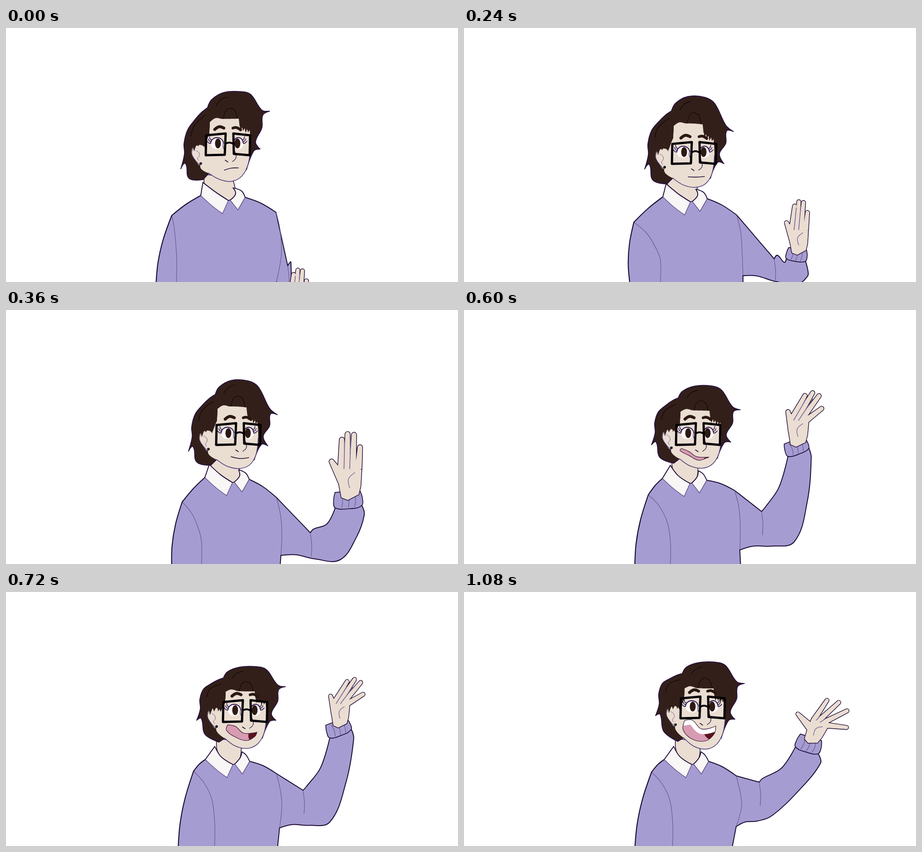
An HTML page with a canvas that plays this animation: 998x561 px, repeating every 1200 ms.

```html
<!DOCTYPE html>
<html lang="en">
<head>
<meta charset="utf-8">
<title>Waving hello</title>
<style>
html, body { margin: 0; width: 100%; height: 100%; overflow: hidden; background: #fff; }
canvas { display: block; }
</style>
</head>
<body>
<canvas id="stage" width="998" height="561"></canvas>
<script>
const ctx = document.getElementById('stage').getContext('2d');
ctx.lineJoin = ctx.lineCap = 'round';
const INK = '#1d0a33', SOFT = '#6c5590', LASH = '#2a1350', HAIR = '#331f1a', SKIN = '#eaddd1',
  KNIT = '#a59dd2', CLOTH = '#f9f6f6', FRAME = '#050308';

// head: x, y, height   droop: hair left, right   look: face offset   mouth: smile, open
// body: left shoulder, left hem x, seam reach   tip: right shoulder   pit: armpit, hem x
// crook, elbow: bend of the arm   cuff: x, y, tilt, size   hand: length, lean, spread, palm lean
const poses = [
  { head: [490, 243, 1.03], droop: [1.3, -0.2], look: [0, 13], mouth: [0, 0], body: [366, 414, 331, 10], collar: [492, 380],
    tip: [596, 407], pit: [597, 561, 597], crook: [622, 525], elbow: [600, 580], cuff: [640, 650, 0, 1], hand: [113, 2, 0.9, 0] },
  { head: [503, 254, 1.05], droop: [1, 1], look: [5, 21], mouth: [0.15, 0], body: [375, 429, 367, 58], collar: [501, 383],
    tip: [602, 413], pit: [616, 547, 616], crook: [685, 510], elbow: [737, 565], cuff: [735, 499, 0.15, 0.8], hand: [113, 2, 0.9, 0] },
  { head: [507, 255, 1.02], droop: [1, 1], look: [6, 18], mouth: [0.25, 0], body: [389, 424, 366, 42], collar: [501, 380],
    tip: [597, 414], pit: [607, 542, 605], crook: [672, 492], elbow: [737, 552], cuff: [755, 416, -0.08, 1.1], hand: [141, 0, 1, 0] },
  { head: [514, 259, 1], droop: [1, 1], look: [-3, 14], mouth: [0.25, 0], body: [404, 412, 382, 38], collar: [498, 386],
    tip: [596, 406], pit: [611, 547, 603], crook: [671, 467], elbow: [702, 545], cuff: [753, 351, -0.25, 1.1], hand: [130, 14, 1.2, 2] },
  { head: [518, 261, 0.95], droop: [0.5, 0.3], look: [-1, 12], mouth: [0.9, 0.1], body: [407, 408, 377, 48], collar: [500, 382],
    tip: [598, 399], pit: [609, 530, 611], crook: [657, 445], elbow: [729, 512], cuff: [733, 300, -0.36, 0.92], hand: [120, 19, 1.3, 2] },
  { head: [525, 258, 0.94], droop: [0.2, 0], look: [3, 4], mouth: [0.95, 0.5], body: [414, 396, 380, 46], collar: [502, 380],
    tip: [597, 401], pit: [604, 521, 599], crook: [656, 438], elbow: [715, 508], cuff: [733, 298, -0.37, 0.95], hand: [108, 21, 1.4, 2] },
  { head: [527, 254, 1], droop: [0, 0], look: [0, 0], mouth: [1, 1], body: [414, 398, 377, 46], collar: [504, 380],
    tip: [601, 406], pit: [601, 518, 591], crook: [652, 420], elbow: [680, 494], cuff: [762, 334, 0.3, 0.98], hand: [108, 41, 2.4, 27] }
];

// Head outlines around the middle of the face.
const hair = [-55,76, -86,54, -94,16, -104,19, -96,-6, -97,-29, -89,-52, -72,-63, -58,-70, -45,-74, -36,-88, -9,-98,
  28,-99, 50,-92, 75,-56, 92,-52, 77,-45, 75,-18, 61,11, 71,27, 57,30, 41,69, -2,36, -42,68];
const face = [-40,-41, -28,-46, -15,-42, 5,-41, 24,-41, 26,-24, 48,-16, 50,18, 45,56, 31,82, 8,93, -19,87, -42,68, -61,46, -49,1, -41,-22];

const mix = (a, b, k) => a.map((v, i) => v + (b[i] - v) * k);
const add = (p, x, y) => p.map((v, i) => v + (i % 2 ? y : x));
const pt = (p, i) => p.slice(2 * i, 2 * i + 2);
const turn = ([x, y], a) => [x * Math.cos(a) - y * Math.sin(a), x * Math.sin(a) + y * Math.cos(a)];

function poseAt(step) {
  const u = step < 2 ? step / 2 : step < 6 ? step - 1 : 5 + (step - 6) / 3;
  const i = Math.min(Math.floor(u), poses.length - 2), out = {};
  for (const key in poses[i]) out[key] = mix(poses[i][key], poses[i + 1][key], u - i);
  return out;
}

// Smooth line through x,y pairs; the points listed in sharp stay corners.
function curve(p, closed, sharp = []) {
  const n = p.length / 2, at = i => pt(p, i % n);
  const dir = i => {
    i %= n;
    if (sharp.includes(i) || (!closed && (i === 0 || i === n - 1))) return [0, 0];
    const a = at(i + n - 1), b = at(i + 1), d = Math.hypot(b[0] - a[0], b[1] - a[1]) || 1;
    return [(b[0] - a[0]) / d, (b[1] - a[1]) / d];
  };
  ctx.beginPath();
  ctx.moveTo(...at(0));
  for (let i = 0; i < (closed ? n : n - 1); i++) {
    const a = at(i), b = at(i + 1), s = dir(i), e = dir(i + 1);
    const r = Math.hypot(b[0] - a[0], b[1] - a[1]) * 0.35;
    ctx.bezierCurveTo(a[0] + s[0] * r, a[1] + s[1] * r, b[0] - e[0] * r, b[1] - e[1] * r, b[0], b[1]);
  }
  if (closed) ctx.closePath();
}
function paint(fill, line, width) {
  if (fill) { ctx.fillStyle = fill; ctx.fill(); }
  if (line) { ctx.strokeStyle = line; ctx.lineWidth = width; ctx.stroke(); }
}
function shape(p, fill, line, width, sharp) { curve(p, true, sharp); paint(fill, line, width); }
function stroke(p, line, width, sharp) { curve(p, false, sharp); paint(null, line, width); }
function oval(x, y, rx, ry, fill) {
  ctx.beginPath();
  ctx.ellipse(x, y, rx, ry, 0, 0, Math.PI * 2);
  paint(fill);
}

function drawBody(p) {
  const [sx, sy, hem, reach] = p.body, [cx, cy] = p.collar, [tx, ty] = p.tip, [px, py, hemR] = p.pit;
  const [x, y, tilt, size] = p.cuff, shoulder = [sx, sy], foot = [hem, 570], neck = [cx - 62, cy - 10];
  const side = [...foot, ...add(mix(foot, shoulder, 0.33), -7, 0), ...add(mix(foot, shoulder, 0.66), -7, 0),
    ...shoulder, ...add(mix(shoulder, neck, 0.5), 0, -3), ...neck];
  const top = [cx + 36, cy - 6, ...add(mix([cx + 36, cy - 6], p.tip, 0.5), 0, -4), tx, ty];
  const seam = [tx, ty, tx + 9, ty + 38, tx + 12, ty + (py - ty) * 0.6, px, py];

  const cuffL = add(turn([-27 * size, 17 * size], tilt), x, y), cuffR = add(turn([27 * size, 17 * size], tilt), x, y);
  const upper = [tx, ty, ...mix(p.tip, p.crook, 0.55), ...p.crook, ...add(p.crook, 7, -8),
    ...add(mix(p.crook, cuffL, 0.5), 9, 8), ...cuffL];
  const pit = [px, py];
  const lower = [...cuffR, ...add(cuffR, 5, 20), ...add(mix(cuffR, p.elbow, 0.55), 14, 5), ...p.elbow,
    ...add(mix(p.elbow, pit, 0.42), 0, 2), ...add(mix(p.elbow, pit, 0.75), 0, -4), ...pit];

  shape([...upper, ...lower], KNIT, null, 0, [0, 2, 5, 6, 12]);
  shape([...side, ...top, ...seam.slice(2), hemR, 570], KNIT, null, 0, [0, 3, 5, 6, 8, 11, 12]);
  stroke(upper, INK, 2, [2]);
  stroke(lower, INK, 2);
  stroke(seam, SOFT, 1.2);
  stroke([px, py, hemR, 570], INK, 2);
  stroke([sx, sy, sx + reach * 0.5, sy + 25, sx + reach * 0.88, sy + 62, sx + reach + 1, 515, sx + reach, 570], SOFT, 1.2);
  stroke(add([0, 2, 3, 27, 2, 52], ...p.crook), SOFT, 1.2);
  stroke(side, INK, 2.2, [3]);
  stroke(top, INK, 2);
}

function drawCuff([x, y, tilt, size]) {
  const at = (u, v) => add(turn([u * size, v * size], tilt), x, y);
  shape([...at(-27, 17), ...at(-29, 2), ...at(-25, -14), ...at(25, -14), ...at(29, 2), ...at(26, 17), ...at(0, 21)],
    KNIT, INK, 1.7, [2, 3]);
  for (const u of [-13, 0, 13]) stroke([...at(u, -10), ...at(u + 2, 5), ...at(u - 1, 18)], SOFT, 1.2);
}

function drawHand(p) {
  const [size, lean, spread, palm] = p.hand, rad = Math.PI / 180, x = p.cuff[0] + 4, y = p.cuff[1] - 6;
  const at = (u, v) => add(turn([u * size, v * size], palm * rad), x, y);
  const hand = new Path2D(), bases = [], tips = [];
  // Thumb to little finger: angle and length.
  [[-28, 0.64], [-8, 0.92], [-2, 1], [4, 0.99], [12, 0.81]].forEach(([angle, length], i) => {
    const base = i ? at(-0.225 + 0.09 * i, -0.42) : at(-0.09, -0.22);
    const wide = size * (i ? 0.052 : 0.09), round = size * 0.036;
    const [tx, ty] = add(turn([0, -size * length + round], (lean + angle * spread) * rad), x, y);
    const a = Math.atan2(ty - base[1], tx - base[0]), nx = -Math.sin(a) * wide, ny = Math.cos(a) * wide;
    const finger = new Path2D();
    finger.moveTo(base[0] - nx, base[1] - ny);
    finger.arc(tx, ty, round, a - Math.PI / 2, a + Math.PI / 2);
    finger.lineTo(base[0] + nx, base[1] + ny);
    finger.closePath();
    hand.addPath(finger);
    bases.push(base);
    tips.push([tx, ty]);
  });
  const flat = new Path2D();
  [[-0.13, 0.03], [-0.17, -0.18], [-0.19, -0.42], [-0.1, -0.47], [0.12, -0.46], [0.185, -0.4], [0.17, -0.15], [0.14, -0.02], [-0.03, 0.07]]
    .forEach(q => flat.lineTo(...at(...q)));
  flat.closePath();
  hand.addPath(flat);
  ctx.strokeStyle = INK;
  ctx.lineWidth = 2.8;
  ctx.stroke(hand);
  ctx.fillStyle = SKIN;
  ctx.fill(hand);
  const split = Math.min(0.85, 1.4 / spread ** 2);
  for (const i of [1, 2]) {
    const low = mix(bases[i], bases[i + 1], 0.5);
    stroke([...low, ...mix(low, mix(tips[i], tips[i + 1], 0.5), split)], SOFT, 1.5);
  }
  stroke([...at(0.08, -0.36), ...at(-0.02, -0.26), ...at(0, -0.12)], SOFT, 1.2);
}

function drawCollar(p) {
  const [cx, cy] = p.collar, drift = p.head[0] - cx, tl = -56 + 0.65 * drift, tr = 10 + 0.4 * drift;
  const left = add([tl, -39, -62, -10, -38, 12, -14, 30, -1, 1, -27, -16], cx, cy);
  const right = add([tr, -27, 15, -14, 3, 0, 20, 22, 36, -6, 28, -20], cx, cy);
  shape([...add([tl + 4, -57, tl + 5, -31, -27, -16, -1, 1, 3, 0, 15, -14, tr - 2, -49], cx, cy)], SKIN, INK, 1.5, [0, 3, 4, 6]);
  shape(left, CLOTH, SOFT, 1.6, [0, 1, 3, 4]);
  shape(right, CLOTH, SOFT, 1.6, [0, 2, 3, 4]);
  stroke([...pt(left, 1), ...pt(left, 0), ...pt(left, 5), ...pt(left, 4)], INK, 1.7, [1]);
  stroke([...right.slice(8), ...right.slice(0, 6)], INK, 1.7, [2]);
}

// Fringe ends hanging along the line a-b.
function spikes(a, b, n, len) {
  ctx.beginPath();
  ctx.moveTo(a[0], a[1] - 6);
  for (let i = 0; i < n; i++) {
    const [x, y] = mix(a, b, (i + 0.35) / n);
    ctx.lineTo(x, y + len * (i % 2 ? 0.7 : 1));
    ctx.lineTo(...mix(a, b, (i + 1) / n));
  }
  ctx.lineTo(b[0], b[1] - 6);
  ctx.closePath();
  paint(HAIR);
}

function drawEye(x, y, side) {
  const w = side < 0 ? 14 : 11, cx = x + side * 2, inner = cx - side * w;
  oval(cx, y, w, 13, '#fffafa');
  oval(x, y, 6.5, 11, '#2d1a12');
  ctx.beginPath();
  ctx.ellipse(cx, y, w, 13, 0, Math.PI * 1.02, Math.PI * 1.98);
  paint(null, LASH, 2);
  stroke([inner, y - 3, inner + side, y + 5, inner - side, y + 12], '#4b3578', 1.3);
  for (let i = 0; i < 3; i++) {
    const ex = cx + side * (w - i * 1.6), ey = y - i * 4;
    stroke([ex, ey, ex + side * 4, ey - 1, ex + side * (8 - i), ey - 5 - i], LASH, 1.6);
  }
}

function drawMouth(x, y, [smile, open]) {
  const l = [x - 8 - 32 * smile, y + 58 - 28 * smile], r = [x + 23 + 6 * open, y + 53 - 11 * open];
  if (open === 0) {
    stroke([...l, ...add(mix(l, r, 0.5), 0, 20 * smile - 2), ...r], INK, 1.6);
    return;
  }
  const lip = [...l, ...add(l, 17, 8 - 9 * open), ...add(mix(l, r, 0.55), 0, 7 + 5 * open), ...r];
  const mouth = [...lip, ...add(r, -4, 18 * open), ...add(r, -23, 4 + 29 * open), ...add(l, 17, 13 + 28 * open), ...add(l, -3, 3 + 18 * open)];
  ctx.save();
  curve(mouth, true, [0, 3]);
  ctx.clip();
  paint('#d79bb2');
  oval(r[0], r[1] + 8, 10 + 18 * open, 9 + 16 * open, '#5c121c');
  const teeth = 44 * (open - 0.5);
  if (teeth > 0) stroke(lip, '#fff', teeth);
  ctx.restore();
  shape(mouth, null, '#3a1838', 1.2, [0, 3]);
}

function drawFeatures(x, y, mouth) {
  drawEye(x - 22, y - 1, -1);
  drawEye(x + 21, y - 1, 1);
  stroke(add([-29, -32, -19, -38, -9, -35], x, y), '#2a1814', 6.5);
  stroke(add([11, -35, 19, -36, 28, -31], x, y), '#2a1814', 6);
  stroke(add([-6, 36, 0, 40], x, y), INK, 1.6);
  stroke(add([14, 14, 18, 30, 10, 39], x, y), INK, 1.3);
  drawMouth(x, y, mouth);
  const corners = [0, 1, 2, 3];
  shape(add([-48, -19, -5, -23, -7, 24, -49, 25], x, y), null, FRAME, 5, corners);
  shape(add([12, -23, 49, -19, 48, 25, 13, 22], x, y), null, FRAME, 5, corners);
  stroke(add([-6, 0, 3, -3, 12, 0], x, y), FRAME, 4);
}

function drawHead(p) {
  const [hx, hy, tall] = p.head;
  // Outer parts of the head sink as the hair droops.
  const place = q => q.map((v, i) => {
    if (i % 2 === 0) return hx + v;
    const x = q[i - 1];
    return hy + v * tall + p.droop[x < 0 ? 0 : 1] * 28 * (x / 90) ** 2;
  });
  const f = place(face), [ex, ey] = place([-60, 39]);
  shape(place(hair), HAIR, '#241040', 1.8, [0, 3, 9, 15, 19, 21, 23]);
  shape(f, SKIN, null, 0, [0, 2, 4, 5, 6, 12, 14]);
  stroke(f.slice(14, 26), '#4b3a78', 1.5);
  const ear = add([-16, -36, -20, -22, -11, -6, -1, 4, 9, -6, 6, -38], ex, ey);
  shape(ear, SKIN);
  stroke(ear.slice(0, 8), '#4b3a78', 1.2);
  stroke(add([-11, -29, -4, -24, -3, -17, -7, -11, -4, -6], ex, ey), SOFT, 1);
  oval(ex, ey, 2.8, 2.8, '#0d0812');
  spikes([ex - 18, ey - 37], [f[30], f[31] + 6], 4, 13);
  spikes(pt(f, 5), pt(f, 6), 4, 10);
  for (const lock of [[-82, -33, -74, -51, -50, -60], [-10, -42, -5, -58, 3, -64], [5, -64, 15, -59, 21, -42], [-26, -72, -16, -83, -2, -88]])
    stroke(place(lock), '#0e0606', 1.2);
  drawFeatures(hx + p.look[0], hy + p.look[1], p.mouth);
}

const start = performance.now();
function loop() {
  const p = poseAt(Math.floor((performance.now() - start) % 1200 / 120));
  ctx.fillStyle = '#fff';
  ctx.fillRect(0, 0, 998, 561);
  drawBody(p);
  drawCuff(p.cuff);
  drawHand(p);
  drawCollar(p);
  drawHead(p);
  requestAnimationFrame(loop);
}
loop();
</script>
</body>
</html>
```
